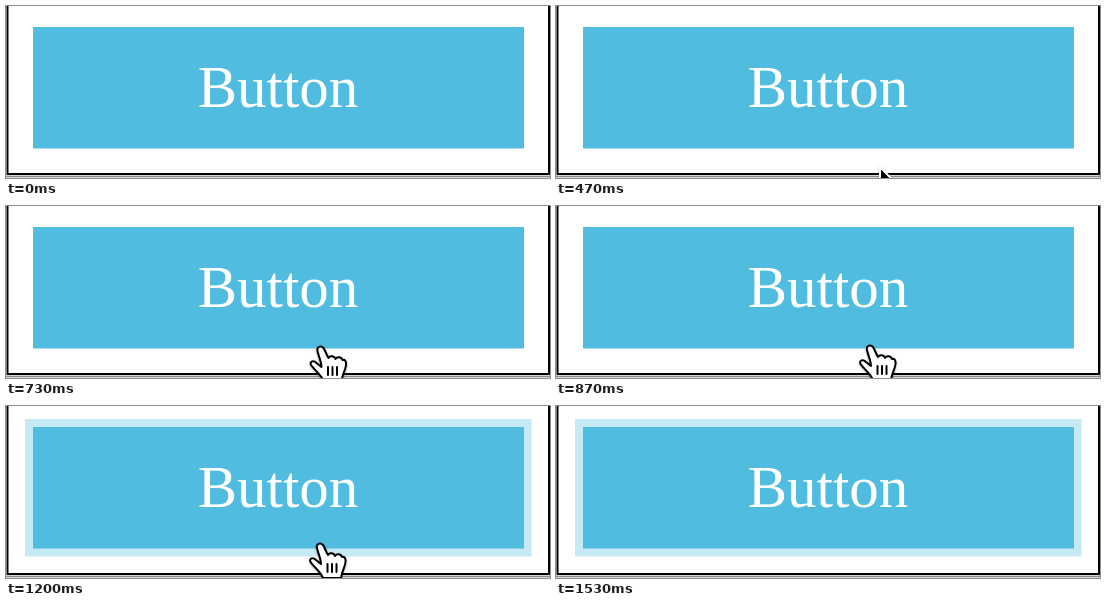
These frames come from a looping animation (544x172 px, 1.59 s). An HTML page:

```html
<!DOCTYPE html>
<html lang="en">
<head>
<meta charset="utf-8">
<title>Button focus ring</title>
<style>
  html, body { margin: 0; width: 100%; height: 100%; overflow: hidden; background: #fff; }
  svg { display: block; width: 544px; height: 172px; }
  text { font: 59px "Liberation Serif", "Times New Roman", serif; fill: #fff; text-anchor: middle; }
  .cursor { stroke-linejoin: round; stroke-linecap: round; filter: drop-shadow(0 1px 1px #0005); }
</style>
</head>
<body>
<svg viewBox="0 0 544 172">
  <rect y="169" width="544" height="3" fill="#d4d4d4"/>
  <rect y="170" width="544" height="1" fill="#8c8c8c"/>
  <path d="M1.5 0V168H543V0" fill="#fff" stroke="#000" stroke-width="2"/>
  <rect id="ring" x="19" y="13" width="506.5" height="137.5" fill="#c5eaf6"/>
  <rect x="27" y="21" width="491" height="121.5" fill="#4fbce0"/>
  <text x="272" y="101">Button</text>
  <path id="arrow" class="cursor" fill="#000" stroke="#fff" stroke-width="2"
    d="M0 0V24L5.5 19L9.5 28L13.5 26.3L9.7 17.5H17Z"/>
  <g id="hand" class="cursor" stroke="#000" stroke-width="2">
    <path fill="#fff" d="M-4 5C-5 1-1-1 2 2C4 5 5 9 7 12C9 9 13 10 14 13
      C16 10 20 11 21 14C23 13 25 15 24.500 19C24 25 21 27 20 35H2
      C0 29-7 24-10.500 19C-12 15-8 14-5 17L0 21C0 16-3 10-4 5Z"/>
    <path d="M6.500 21V29M11 21V29M15.500 21V29"/>
  </g>
</svg>
<script>
  const LOOP = 1590, FOCUS_AT = 1000;

  // Each pose holds until the next one: start time, shape, tip x, tip y.
  const poses = [
    [0, null, 0, 0],
    [470, "arrow", 324, 161],
    [530, "arrow", 319, 150],
    [600, "hand", 316, 142],
    [670, "hand", 316, 140.5],
    [730, "hand", 315.5, 140],
    [800, "hand", 315, 139.5],
    [870, "hand", 315, 139],
    [1000, "hand", 315, 138],
    [1130, "hand", 315, 137.5],
    [1200, "hand", 315, 137],
    [1470, "arrow", 314, 156],
    [1530, null, 0, 0]
  ];
  const byId = id => document.getElementById(id);
  const cursors = [byId("arrow"), byId("hand")];
  const ring = byId("ring");
  const show = (node, on) => node.setAttribute("visibility", on ? "visible" : "hidden");

  function draw(now) {
    const time = now % LOOP;
    const [, shape, x, y] = poses.findLast(pose => pose[0] <= time);
    for (const cursor of cursors) {
      show(cursor, cursor.id === shape);
      cursor.setAttribute("transform", `translate(${x} ${y})`);
    }
    show(ring, time >= FOCUS_AT);
  }

  const start = performance.now();
  function tick() {
    draw(performance.now() - start);
    requestAnimationFrame(tick);
  }
  tick();
</script>
</body>
</html>
```
